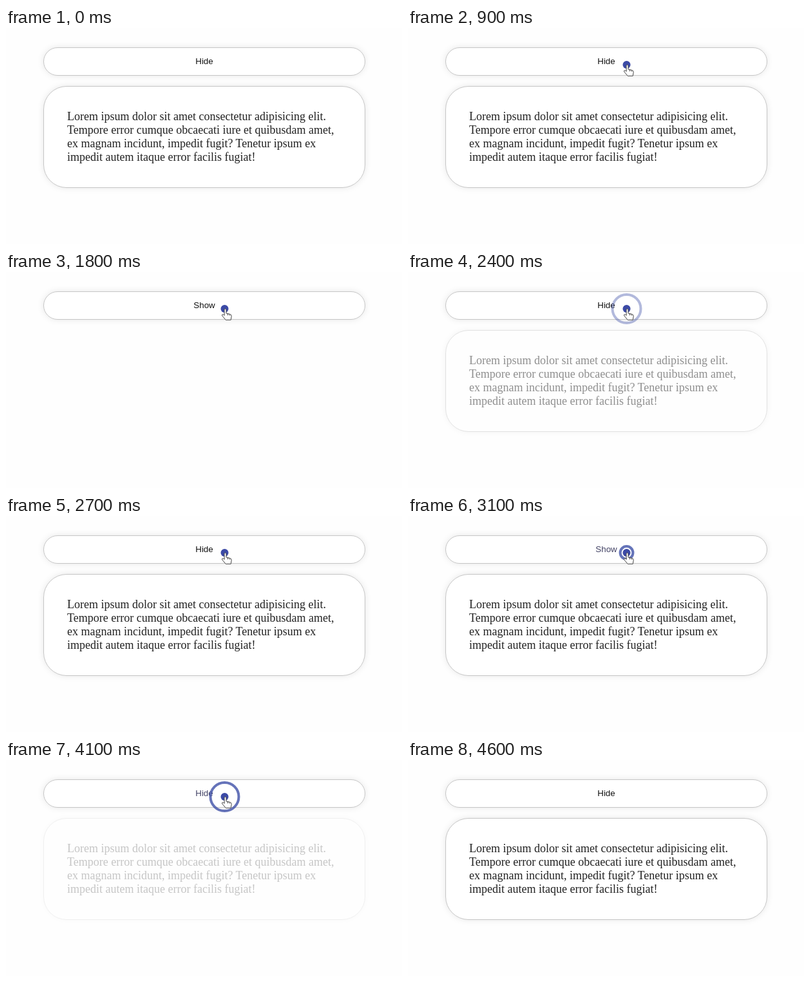
Recreate the animation shown at these times as an HTML page. Size 615 px wide and 335 px high, loop 5100 ms.

```html
<!DOCTYPE html>
<html lang="en">
<head>
<meta charset="utf-8">
<title>Fade toggle</title>
<style>
  html, body { margin: 0; width: 100%; height: 100%; overflow: hidden; background: #fefefe; }
  svg { display: block; }
  .box { fill: #fff; stroke: #c6c6c6; filter: drop-shadow(0 0 5px #00000018); }
  #label { font: 13.333px "Liberation Sans", Arial, sans-serif; text-anchor: middle; }
  #panel text { font: 18px "Liberation Serif", "Times New Roman", serif; fill: #222; }
  #pointer path { fill: #fff; stroke: #444; stroke-linejoin: round; }
  #dot { fill: #3c4aa6; }
  #ring { fill: none; stroke: #3f51a8; stroke-width: 4; }
</style>
</head>
<body>
<svg width="615" height="335" viewBox="0 0 615 335">
  <rect class="box" x="58.5" y="30.5" width="499" height="43" rx="21.5"/>
  <text id="label" x="308" y="56">Hide</text>
  <g id="panel">
    <rect class="box" x="58.5" y="90.5" width="499" height="157" rx="35.5"/>
    <text x="95" y="143">Lorem ipsum dolor sit amet consectetur adipisicing elit.</text>
    <text x="95" y="164">Tempore error cumque obcaecati iure et quibusdam amet,</text>
    <text x="95" y="185">ex magnam incidunt, impedit fugit? Tenetur ipsum ex</text>
    <text x="95" y="206">impedit autem itaque error facilis fugiat!</text>
  </g>
  <circle id="ring" cx="339.5" cy="57"/>
  <g id="pointer">
    <circle id="dot" cx="-.5" r="6"/>
    <path id="hand" d="M-1 2q0-2 1.5-2t1.5 2v5l5.5 1.3q3 .8 2.7 3.5l-1 5.5h-8l-5.5-6.5q-1-2 1.5-2l2 1.5zM4.5 7.8v2.5M7.3 8.4v2.2"/>
    <path id="arrow" d="M0 0v16l4-4 3 6 2-1-3-6h5z"/>
  </g>
</svg>
<script>
  const LOOP = 5100, STEP = 100, FADE = 400;
  const clicks = [1400, 2200, 3100, 4000];
  // time, x, y
  const route = [[100, 387, 266], [600, 350, 60], [900, 340, 57], [4200, 340, 57], [4500, 324, 294]];
  const $ = id => document.getElementById(id);
  const show = (id, on) => $(id).setAttribute("visibility", on ? "visible" : "hidden");
  const clamp = v => Math.min(1, Math.max(0, v));
  const smooth = v => v * v * (3 - 2 * v);

  function position(t) {
    const i = Math.max(1, route.findIndex(p => p[0] >= t));
    const [t0, x0, y0] = route[i - 1], [t1, x1, y1] = route[i];
    const k = smooth(clamp((t - t0) / (t1 - t0)));
    return [x0 + (x1 - x0) * k, y0 + (y1 - y0) * k];
  }

  function draw(t) {
    const past = clicks.filter(c => c <= t);
    const age = past.length ? t - past.at(-1) : Infinity;
    const open = past.length % 2 === 0;
    const faded = clamp(age / FADE);

    $("label").textContent = open ? "Hide" : "Show";
    $("label").setAttribute("fill", age <= 100 ? "#446" : "#111");
    $("panel").setAttribute("opacity", open ? faded : 1 - faded);

    show("ring", age < 300);
    $("ring").setAttribute("r", 22 * clamp(0.45 + age / 180));
    $("ring").setAttribute("opacity", 0.8 * clamp((300 - age) / 200));

    const inside = t >= 100 && t <= 4500;
    if (inside) {
      const [x, y] = position(t);
      const hovering = y < 74;
      $("pointer").setAttribute("transform", `translate(${x} ${y})`);
      show("dot", t >= 700 && t <= 4200);
      show("hand", hovering);
      show("arrow", !hovering);
    }
    $("pointer").setAttribute("display", inside ? "inline" : "none");
  }

  function tick() {
    const t = performance.now() % LOOP;
    draw(Math.floor(t / STEP) * STEP);
    requestAnimationFrame(tick);
  }
  tick();
</script>
</body>
</html>
```
